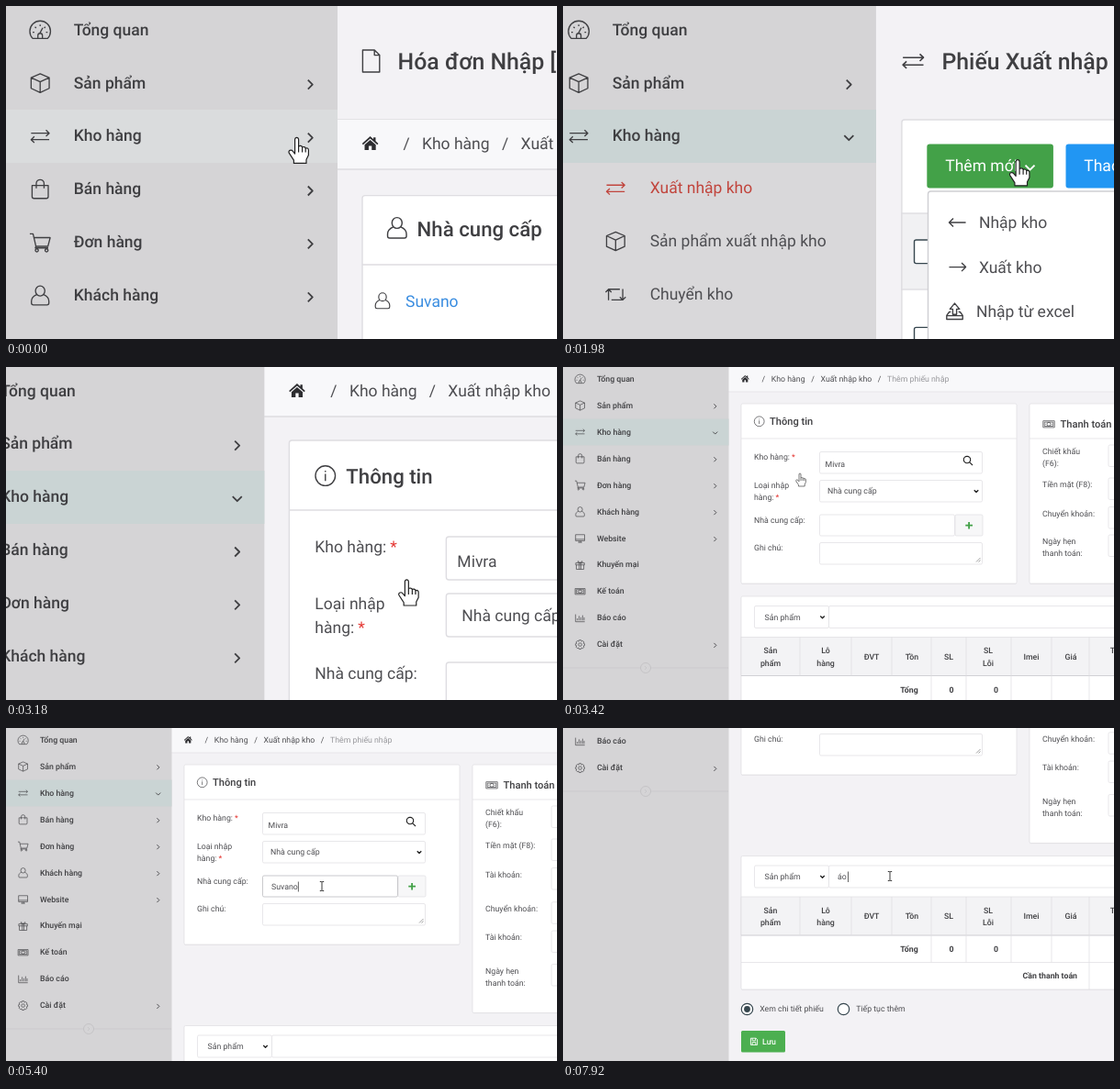
An HTML page that plays this animation: 600x363 px, repeating every 8 s.

```html
<!DOCTYPE html>
<html lang="vi">
<head>
<meta charset="utf-8">
<title>Nhập kho</title>
<style>
html, body { margin: 0; width: 100%; height: 100%; overflow: hidden; background: #f3f2f5; }
svg { display: block; width: 600px; height: 363px; }
text { font-family: Roboto, "Noto Sans", sans-serif; text-rendering: geometricPrecision; white-space: pre; }
</style>
</head>
<body>
<svg id="stage" viewBox="0 0 600 363"></svg>
<script>
const LOOP = 8000, SIZE = 8.75;
const INK = '#3f3f42', BODY = '#4e4e52', LINE = '#dedde1', RED = '#c1453d', GREEN = '#43a148';
const SUPPLIER = 'Suvano', STORE = 'Mivra';

const ICONS = {
  gauge: 'M-4.6 5.2A6.4 6.4 0 1 1 4.6 5.2ZM-.4 2.4 1.6-1.4M-4.6 1.4H-3.6M3.6 1.4H4.6M-3.2-2-2.5-1.3M0-3.4V-2.4M3.2-2 2.5-1.3M-1.4 5.2V3.4A1.4 1.4 0 0 1 1.4 3.4V5.2',
  cube: 'M0-5.8 5.6-3.4V3.2L0 5.8-5.6 3.2V-3.4ZM-5.6-3.4 0-.8 5.6-3.4M0-.8V5.8',
  swap: 'M-5.6-1.9H5.6M3.6-3.8 5.6-1.9 3.6 0M5.6 2.1H-5.6M-3.6 .2-5.6 2.1-3.6 4',
  bag: 'M-5-2.4H5V4.4Q5 5.6 3.8 5.6H-3.8Q-5 5.6-5 4.4ZM-2.4-.6V-3.6A2.4 2.4 0 0 1 2.4-3.6V-.6',
  cart: 'M-6.4-5.4H-4.4L-2.6 2.4H4.8L6.2-3H-3.8M-2.6 2.4-3 3.4H5M-2 4A.9.9 0 1 1-2.1 4M4 4A.9.9 0 1 1 3.9 4',
  user: 'M0-6A2.9 3.1 0 0 1 0 .2 2.9 3.1 0 0 1 0-6ZM-2.2-.6C-4.4 .4-5.4 1.6-5.4 3.4V4.6Q-5.4 5.8-4.2 5.8H4.2Q5.4 5.8 5.4 4.6V3.4C5.4 1.6 4.4 .4 2.2-.6',
  screen: 'M-5.6-4.6H5.6V3H-5.6ZM-5.6 1.2H5.6M-2.4 5H2.4M-1 3V5M1 3V5',
  gift: 'M-5.4-2.4H5.4V0H-5.4ZM-4.6 0V5.4H4.6V0M-1-2.4V5.4M1-2.4V5.4M0-2.4C-5-3-3-7 0-2.4 3-7 5-3 0-2.4',
  money: 'M-6.2-3.6H6.2V3.6H-6.2ZM-4.8-2.2H4.8V2.2H-4.8ZM0-2A2 2 0 0 1 0 2 2 2 0 0 1 0-2M-3.4-.4V.4M3.4-.4V.4',
  chart: 'M-5.6-4.6V4.6H5.8M-3.4 3V.4M-1.2 3V-2.6M1 3V-1M3.2 3V-3.4M5 3V-.8',
  gear: 'M-1.2-5.6H1.2L1.7-4 3.4-4.6 5-3 4.2-1.5 5.6-1V1L4.2 1.5 5 3 3.4 4.6 1.7 4 1.2 5.6H-1.2L-1.7 4-3.4 4.6-5 3-4.2 1.5-5.6 1V-1L-4.2-1.5-5-3-3.4-4.6-1.7-4ZM0-2A2 2 0 0 1 0 2 2 2 0 0 1 0-2',
  doc: 'M-4.6-6H1.8L4.6-3.2V6H-4.6ZM1.8-6V-3.2H4.6',
  loop: 'M-4.4 3.6V-3.2H2.6M-6.2-1.4-4.4-3.2-2.6-1.4M4.4-3.4V3.4H-2.6M6.2 1.6 4.4 3.4 2.6 1.6',
  left: 'M5.2 0H-5.2M-2.6-2.6-5.2 0-2.6 2.6',
  right: 'M-5.2 0H5.2M2.6-2.6 5.2 0 2.6 2.6',
  upload: 'M-1.2 2V-1.4H-3L0-5 3-1.4H1.2V2ZM-2.4 .4H-3.4L-5 2.6V5H5V2.6L3.4 .4H2.4M-5 2.8H5',
  info: 'M0-5.4A5.4 5.4 0 0 1 0 5.4 5.4 5.4 0 0 1 0-5.4M0-1V2.8M0-2.8V-2',
  search: 'M-1-4.6A3.7 3.7 0 0 1-1 2.8 3.7 3.7 0 0 1-1-4.6M1.7 1.8 5 5',
  save: 'M-3.6-3.6H2.2L3.6-2.2V3.6H-3.6ZM-1.8-3.6V-1H1.6V-3.6M-1.8 3.6V.8H1.8V3.6',
  list: 'M-5-4H5M-5 0H5M-5 4H5',
  next: 'M-1.3-2.5 1.2 0-1.3 2.5',
  down: 'M-2.5-1.2 0 1.3 2.5-1.2'
};

function add(parent, tag, attrs) {
  const node = document.createElementNS('http://www.w3.org/2000/svg', tag);
  for (const k in attrs) node.setAttribute(k, attrs[k]);
  parent.appendChild(node);
  return node;
}
const group = (p, x = 0, y = 0) => add(p, 'g', { transform: `translate(${x} ${y})` });
const rect = (p, x, y, w, h, fill, stroke = 'none', rx = 0) =>
  add(p, 'rect', { x, y, width: w, height: h, fill, stroke, rx, 'stroke-width': .7 });
const line = (p, x1, y1, x2, y2, stroke = LINE) =>
  add(p, 'path', { d: `M${x1} ${y1}L${x2} ${y2}`, stroke, 'stroke-width': .7 });
function text(p, x, y, str, { size = SIZE, fill = BODY, weight = 400, anchor = 'start' } = {}) {
  const node = add(p, 'text', { x, y: y + size * .355, 'font-size': size, fill, 'font-weight': weight, 'text-anchor': anchor });
  node.textContent = str;
  return node;
}
const icon = (p, name, x, y, stroke = INK, width = .7, scale = 1) =>
  add(p, 'path', { d: ICONS[name], fill: 'none', stroke, 'stroke-width': width, 'stroke-linejoin': 'round',
    transform: `translate(${x} ${y}) scale(${scale})` });
const move = (node, x, y) => node.setAttribute('transform', `translate(${x} ${y})`);
const show = (node, on) => node.setAttribute('visibility', on ? 'visible' : 'hidden');
const heading = { size: 11.1, weight: 500, fill: INK };
const title = { size: 12.4, weight: 500, fill: INK };
const card = (p, x, y, w, h) => {
  rect(p, x, y + .8, w, h, '#e6e5e9', 'none', 1.5);
  return rect(p, x, y, w, h, '#fff', LINE, 1.5);
};
const field = (p, x, y, w, h = 23.5) => rect(p, x, y, w, h, '#fff', LINE, 1.5);

const cam = group(document.getElementById('stage'));
rect(cam, 0, 0, 700, 400, '#f3f2f5');

function crumbs(p, y, parts) {
  rect(p, 180, y - 13, 520, 27, '#f8f8fa');
  line(p, 180, y + 14, 700, y + 14);
  add(p, 'path', { d: 'M0-4.3-4.8 0-4.2 .7 0-3 4.2 .7 4.8 0 3.2-1.5V-3.7H1.9V-2.6ZM0-2.2-3.3 .7V3.8H-.9V1.3H.9V3.8H3.3V.7Z',
    fill: '#2d2d30', transform: `translate(198.3 ${y}) scale(.92)` });
  parts.forEach(([x, str], i) => {
    text(p, x - 10.3, y, '/');
    text(p, x, y, str, { fill: i == 2 ? '#98989c' : BODY });
  });
}

// Invoice page
const invoice = group(cam);
icon(invoice, 'doc', 198.8, 30);
text(invoice, 213.3, 30.3, 'Hóa đơn Nhập [Nháp]', title);
line(invoice, 180, 62, 700, 62);
crumbs(invoice, 75, [[226.5, 'Kho hàng'], [280.3, 'Xuất nhập kho']]);
card(invoice, 194, 103.3, 400, 260);
line(invoice, 194, 141, 594, 141);
icon(invoice, 'user', 212.9, 121, INK, .75, .95);
text(invoice, 223.8, 121.5, 'Nhà cung cấp', heading);
icon(invoice, 'user', 205, 160.7, INK, .8, .72);
text(invoice, 217.5, 160.7, SUPPLIER, { fill: '#3a8de0' });

// Stock slips page
const slips = group(cam);
icon(slips, 'swap', 200.7, 30, INK, .8);
text(slips, 216.3, 30.3, 'Phiếu Xuất nhập kho', title);
card(slips, 194.5, 62, 400, 320);
rect(slips, 194.5, 113, 400, 41.5, '#f1f1f3', LINE);
for (const y of [127.5, 175.2]) rect(slips, 201.3, y, 12.5, 12.8, '#fff', '#37474f', 1);
rect(slips, 208.2, 75.3, 68.8, 24, GREEN, 'none', 1.5);
text(slips, 218.2, 87.1, 'Thêm mới', { fill: '#fff' });
icon(slips, 'down', 264.3, 88, '#fff', 1);
rect(slips, 283.8, 75.3, 70, 24, '#2196f3', 'none', 1.5);
text(slips, 293.7, 87.1, 'Thao tác', { fill: '#fff' });
const addMenu = group(slips);
rect(addMenu, 209, 101.5, 120, 95, '#dcdce0', 'none', 1.5);
rect(addMenu, 208.8, 101, 119.4, 95, '#fff', '#cfcfd3', 1.5);
const addHover = rect(addMenu, 209.4, 106.5, 118.2, 24, '#f3f3f4');
[['left', 'Nhập kho', 118, 236.5], ['right', 'Xuất kho', 142.3, 236.5], ['upload', 'Nhập từ excel', 166.4, 235]]
  .forEach(([name, str, y, x]) => {
    icon(addMenu, name, x - 11.7, y, INK, .8, .87);
    text(addMenu, x, y, str);
  });

// New slip form
const form = group(cam);
crumbs(form, 13, [[226.8, 'Kho hàng'], [280.5, 'Xuất nhập kho'], [353, 'Thêm phiếu nhập']]);
card(form, 194, 40, 300, 196);
line(form, 194, 78, 494, 78);
icon(form, 'info', 213.7, 59.3);
text(form, 225, 59.5, 'Thông tin', heading);
[['Kho hàng:', 98, 249], ['Loại nhập', 129], ['hàng:', 142, 231.5], ['Nhà cung cấp:', 167], ['Ghi chú:', 197]]
  .forEach(([str, y, star]) => {
    text(form, 208, y, str);
    if (star) text(form, star, y, '*', { fill: '#e53935' });
  });
field(form, 279.5, 92.5, 177);
text(form, 285.5, 106, STORE);
icon(form, 'search', 441, 102, '#222', 1.1);
field(form, 279.5, 123.5, 177);
text(form, 288, 135.3, 'Nhà cung cấp');
icon(form, 'down', 450, 135.3, '#222', 1.5, .9);
rect(form, 427, 161, 30, 23, '#f7f7f8', LINE, 1.5);
add(form, 'path', { d: 'M438.3 172.7H446M442.1 168.9V176.5', stroke: GREEN, 'stroke-width': 1.8 });
const supplierBox = field(form, 279.5, 161, 147, 23);
const supplier = text(form, 289, 173, '');
const supplierCaret = line(form, 320, 167.5, 320, 178.5, '#222');
field(form, 279.5, 191.5, 177);
add(form, 'path', { d: 'M450 212.5 454.5 208M452.5 212.5 454.5 210.5', stroke: '#777', 'stroke-width': .7 });

// Payment card: account rows slide in as it grows
const payCard = card(form, 508, 40, 200, 196);
const payShade = payCard.previousSibling;
line(form, 508, 78, 700, 78);
icon(form, 'money', 529, 62.3);
text(form, 541.5, 62.3, 'Thanh toán', heading);
function payRow(y, ...labels) {
  const g = group(form, 0, y);
  labels.forEach((str, i) => text(g, 522, i * 13, str));
  field(g, 594, -7, 60);
  return g;
}
payRow(92, 'Chiết khấu', '(F6):');
payRow(128, 'Tiền mặt (F8):');
const account1 = payRow(159.5, 'Tài khoản:');
const account2 = payRow(228, 'Tài khoản:');
const transfer = payRow(159.5, 'Chuyển khoản:');
const dueDate = payRow(190, 'Ngày hẹn', 'thanh toán:');

const picker = group(form);
rect(picker, 279, 184, 148, 49.5, '#fff', '#b9b9bd');
rect(picker, 279.5, 188, 147, 22, '#eeeef0');
text(picker, 289, 199, SUPPLIER);

// Product table, measured from the top of its card
const table = group(form);
card(table, 194, 0, 500, 145.5);
field(table, 208.5, 10.5, 81, 24);
text(table, 219.5, 22.5, 'Sản phẩm');
icon(table, 'down', 282.5, 22.5, '#222', 1.5, .9);
field(table, 289.5, 10.5, 400, 24);
const product = text(table, 299, 22.7, '');
const productCaret = line(table, 310.5, 17, 310.5, 28.5, '#222');
rect(table, 194, 44.5, 500, 42, '#f3f3f5', LINE);
line(table, 194, 86.5, 700, 86.5, '#c9c9cd');
line(table, 194, 116, 700, 116);
// Column rules; the footer rows merge the leading columns
[258, 314, 358].forEach(x => line(table, x, 44.5, x, 86.5));
[401, 439, 488, 532].forEach(x => line(table, x, 44.5, x, 116));
line(table, 573, 44.5, 573, 145.5);
const bold = { anchor: 'middle', weight: 500, fill: INK };
[[226, 'Sản', 'phẩm'], [286, 'Lô', 'hàng'], [336, 'ĐVT'], [380, 'Tồn'], [420, 'SL'], [463, 'SL', 'Lỗi'],
 [510, 'Imei'], [553, 'Giá'], [608, 'Thành', 'tiền']].forEach(([x, a, b]) => {
  text(table, x, b ? 59 : 65.5, a, bold);
  if (b) text(table, x, 72.5, b, bold);
});
const strong = { ...bold, weight: 700 };
text(table, 377, 101.5, 'Tổng', strong);
text(table, 423, 101.5, '0', strong);
text(table, 471.5, 101.5, '0', strong);
text(table, 560, 130.5, 'Cần thanh toán', { ...strong, anchor: 'end' });
[[200.5, 'Xem chi tiết phiếu'], [305.5, 'Tiếp tục thêm']].forEach(([x, str], i) => {
  add(table, 'circle', { cx: x, cy: 167, r: 6.2, fill: '#fff', stroke: '#37474f', 'stroke-width': 1.2 });
  if (!i) add(table, 'circle', { cx: x, cy: 167, r: 3.4, fill: '#37474f' });
  text(table, x + 13.7, 166.3, str);
});
rect(table, 194, 190.5, 48, 23.5, '#4caf50', 'none', 1.5);
icon(table, 'save', 208, 202.3, '#fff', .9);
text(table, 217, 202.5, 'Lưu', { fill: '#fff', weight: 500 });

// Sidebar
const sidebar = group(cam);
rect(sidebar, 0, 0, 180.5, 400, '#d5d4d6');
const nav = group(sidebar);
const ROW = 28.95, ICON_SCALE = .88;
const active = rect(nav, 0, 56.5, 180.5, 29, '#cad4d4');
const sub = group(nav);
add(sub, 'clipPath', { id: 'subClip' });
const subClip = rect(sub.firstChild, 0, 85.5, 180.5, 0, '#000');
sub.setAttribute('clip-path', 'url(#subClip)');
rect(sub, 0, 85.5, 180.5, 180, '#d9d8da');
const subRows = [['swap', 'Xuất nhập kho'], ['cube', 'Sản phẩm xuất nhập kho'], ['loop', 'Chuyển kho'], ['list', 'Kiểm kho']]
  .map(([name, str], i) => {
    const y = 99.1 + i * ROW;
    return [icon(sub, name, 38.7, y + .2, INK, .75, ICON_SCALE), text(sub, 57.4, y, str)];
  });
const navHead = group(nav), navRest = group(nav);
let chevron;
[['gauge', 'Tổng quan'], ['cube', 'Sản phẩm', 1], ['swap', 'Kho hàng', 1], ['bag', 'Bán hàng', 1], ['cart', 'Đơn hàng', 1],
 ['user', 'Khách hàng', 1], ['screen', 'Website', 1], ['gift', 'Khuyến mại'], ['money', 'Kế toán'], ['chart', 'Báo cáo'],
 ['gear', 'Cài đặt', 1]].forEach(([name, str, more], i) => {
  const p = i < 3 ? navHead : navRest, y = 12.7 + i * ROW;
  icon(p, name, 18.6, y + .4, INK, .75, ICON_SCALE);
  text(p, 36.9, y, str, { weight: 500, fill: INK });
  if (more) {
    const mark = icon(p, 'next', 165.7, y + 1.2, INK, .9);
    if (i == 2) chevron = mark;
  }
});
line(navRest, 0, 328, 180, 328, '#c6c5c8');
add(navRest, 'circle', { cx: 90, cy: 328, r: 5.5, fill: '#d5d4d6', stroke: '#c0bfc2', 'stroke-width': .8 });
icon(navRest, 'next', 90, 328, '#c0bfc2', .8, .8);

// Pointers
const pointer = group(cam);
const hand = add(pointer, 'path', { d: 'M-1 1C-1-.4 1-.4 1 1V5C1.4 4.2 3 4.4 3 5.4 3.4 4.8 4.8 5 4.8 6 5.4 5.4 6.4 5.8 6.4 6.8V9.6L5.2 12V14H-1.6V12.4L-4.2 8.4C-4.8 7-3 6.4-2.2 7.4L-1 8.8ZM1 5V8M3 5.6V8M4.8 6.2V8',
  fill: '#fff', stroke: '#222', 'stroke-width': .6, 'stroke-linejoin': 'round' });
const beam = add(pointer, 'path', { d: 'M-2.2-5H-.6L0-4.5 .6-5H2.2M0-4.5V4.5M-2.2 5H-.6L0 4.5 .6 5H2.2', fill: 'none', stroke: '#222', 'stroke-width': .9 });
const arrow = add(pointer, 'path', { d: 'M0 0V11L2.6 8.6 4.4 12.4 6 11.6 4.3 8H7.8Z', fill: '#fff', stroke: '#111', 'stroke-width': .7 });

const ease = k => k * k * (3 - 2 * k);
// Value at time t from rows of [time, ...values]
function track(t, rows, curve = k => k) {
  const i = rows.findIndex(r => r[0] > t);
  if (i == 0) return rows[0].slice(1);
  if (i < 0) return rows[rows.length - 1].slice(1);
  const a = rows[i - 1], b = rows[i], k = curve((t - a[0]) / (b[0] - a[0]));
  return a.slice(1).map((v, j) => v + (b[j + 1] - v) * k);
}
const PATH = [[60, 158.3, 71.7], [720, 96, 98], [1500, 96, 98], [1920, 257.6, 83.9], [2040, 257.6, 83.9], [2430, 258.5, 113],
  [2700, 258, 116], [3420, 258, 116], [3930, 344, 172.5], [5430, 344, 172.5], [5640, 612, 300], [6839, 612, 300],
  [6840, 552, 341], [7250, 356, 161.5]];
const PAN = [[1740, 0], [2700, -80], [3180, -80], [3390, 0]];
const ZOOM = [[3180, 2], [3390, 1]];
const SCROLL = [[6000, 0, 0], [6300, 78, 45], [6600, 166, 91], [6780, 259, 185]];
const KEYS = [4020, 4080, 4140, 4260, 4320, 4380];
const typed = t => SUPPLIER.slice(0, KEYS.filter(k => t >= k).length);

function render(t) {
  const onForm = t >= 3180, opened = t >= 60;
  const [pan] = track(t, PAN), [zoom] = track(t, ZOOM, ease), [navY, pageY] = track(t, SCROLL);
  cam.setAttribute('transform', `translate(${pan} 0) scale(${zoom})`);

  show(invoice, t < 1080);
  show(slips, t >= 1140 && !onForm);
  show(addMenu, t >= 1920 && !onForm);
  show(addHover, t >= 2220 && !onForm);
  show(form, onForm);

  const [open] = onForm ? [0] : track(t, [[60, 0], [540, 174]], ease);
  active.setAttribute('fill', opened ? '#cad4d4' : '#dadcdd');
  chevron.setAttribute('d', ICONS[opened ? 'down' : 'next']);
  subClip.setAttribute('height', open);
  move(navRest, 0, open);
  move(nav, 0, -navY);
  const picked = t >= 1080;
  subRows[0][0].setAttribute('stroke', picked ? RED : INK);
  subRows[0][1].setAttribute('fill', picked ? RED : BODY);

  const [grow] = track(t, [[5160, 0], [5340, 74.5]], ease);
  move(form, 0, -pageY);
  payCard.setAttribute('height', 196 + grow);
  payShade.setAttribute('height', 196 + grow);
  move(transfer, 0, 159.5 + grow / 2);
  move(account2, 0, 159.5 + grow * .92);
  move(dueDate, 0, 190 + grow);
  for (const row of [account1, account2]) row.setAttribute('opacity', grow / 74.5);
  move(table, 0, 250 + grow);

  const name = typed(t);
  supplier.textContent = name;
  supplierBox.setAttribute('stroke', t >= 3960 ? '#b4b4b8' : LINE);
  const caretX = 289.6 + (name ? supplier.getComputedTextLength() : 0);
  supplierCaret.setAttribute('transform', `translate(${caretX - 320} 0)`);
  show(supplierCaret, t >= 3960 && t < 5640);
  show(picker, t >= 4620 && t < 4980);
  product.textContent = t >= 7860 ? 'áo' : t >= 7740 ? 'ao' : t >= 7620 ? 'a' : '';
  productCaret.setAttribute('transform', `translate(${t >= 7740 ? 0 : t >= 7620 ? -5.5 : -11} 0)`);
  show(productCaret, t >= 7560);

  const [x, y] = track(t, PATH, ease);
  const isBeam = t >= 3780 && t < 5460 || t >= 7200;
  move(pointer, x, y);
  show(hand, t < 3780);
  show(beam, isBeam);
  show(arrow, !isBeam && t >= 5460);
}

const start = performance.now();
function tick() {
  render((performance.now() - start) % LOOP);
  requestAnimationFrame(tick);
}
render(0);
requestAnimationFrame(tick);
</script>
</body>
</html>
```
